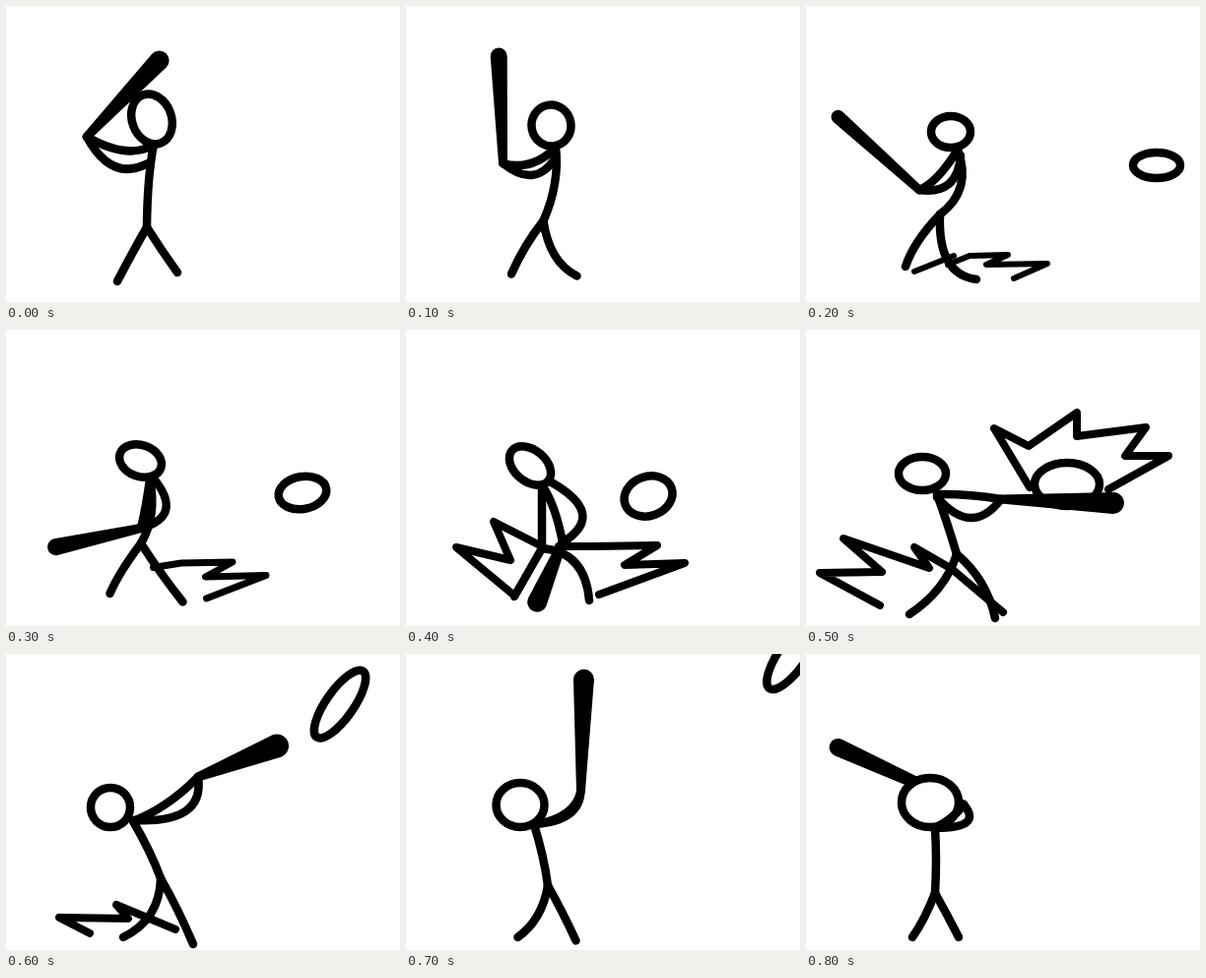
An HTML page that plays this animation: 400x301 px, repeating every 1.3 s.

```html
<!DOCTYPE html>
<html lang="en">
<head>
<meta charset="utf-8">
<title>Batter</title>
<style>
  html, body { margin: 0; width: 100%; height: 100%; overflow: hidden; background: #fff; }
  svg { display: block; width: 100vw; height: 100vh; }
  path, ellipse { fill: none; stroke: #000; stroke-width: 8.5; stroke-linecap: round; stroke-linejoin: round; }
  .head { fill: #fff; }
  .bat { fill: #000; stroke: none; }
</style>
</head>
<body>
<svg id="stage" viewBox="0 0 400 301"></svg>
<script>
const STEP = 100, LOOP = 1300, LAST = 8;

// Key poses; steps in between are mixed from their neighbours.
// head, ball: cx, cy, rx, ry, tilt.  bat: length, angle, end radius.
// legs, arms: middle joint and end; side is where the second arm begins.
const keys = [
  { at: 0, head: [148, 115, 20, 26, -20], ball: [520, 160, 24, 13, 0],
    neck: [150, 141], waist: [145, 178], hip: [143, 225],
    legs: [[129, 250], [113, 280], [158, 248], [174, 271]],
    side: [144, 160], elbows: [[120, 147], [110, 163]], hand: [82, 133],
    bat: [107, -46.5, 10] },

  { at: 2, head: [147, 128, 20, 16, 0], ball: [356, 162, 24, 13, 0],
    neck: [154, 146], waist: [157, 183], hip: [136, 212],
    legs: [[114, 239], [101, 265], [144, 259], [173, 278]],
    side: [157, 152], elbows: [[134, 173], [145, 181]], hand: [115, 187],
    bat: [111, -138, 7], ink: 6,
    bolts: {
      dust: [[110, 270], [150, 254]],
      right: [[144, 263], [166, 254], [205, 253], [183, 263], [245, 262], [211, 277]]
    } },

  { at: 4, head: [126, 138, 24, 16, 40], ball: [246, 169, 25, 20, -20],
    neck: [138, 158], waist: [138, 190], hip: [138, 222],
    legs: [[122, 250], [110, 271], [172, 237], [186, 275]],
    side: [146, 154], elbows: [[150, 182], [179, 186]], hand: [159, 216],
    bat: [66, -247, 10], ink: 8,
    bolts: {
      left: [[138, 220], [89, 195], [106, 234], [51, 221], [110, 270]],
      right: [[155, 220], [190, 220], [255, 219], [222, 239], [283, 237], [196, 269]]
    } },

  { at: 5, head: [118, 146, 24, 17, 0], ball: [265, 157, 33, 22, 0],
    neck: [133, 167], waist: [143, 196], hip: [153, 228],
    legs: [[135, 262], [105, 289], [178, 257], [192, 293]],
    side: [133, 170], elbows: [[165, 168], [167, 191]], hand: [198, 172],
    bat: [114, -358, 11], ink: 8,
    bolts: {
      left: [[200, 287], [148, 243], [110, 221], [125, 242], [38, 212], [77, 246], [14, 247], [75, 280]],
      burst: [[227, 160], [191, 100], [226, 118], [275, 84], [275, 108], [345, 99], [324, 128], [368, 128], [307, 162]]
    } },

  { at: 6, head: [106, 156, 20, 20, 0], ball: [339, 51, 41, 14, -55],
    neck: [129, 170], waist: [145, 200], hip: [157, 228],
    legs: [[147, 264], [119, 288], [174, 260], [190, 295]],
    side: [129, 169], elbows: [[163, 152], [182, 160]], hand: [195, 125],
    bat: [86, -381.5, 12], ink: 8,
    bolts: { left: [[172, 280], [112, 255], [124, 269], [54, 268], [85, 284]] } },

  { at: LAST, head: [126, 151, 29, 25, 0], ball: [446, -48, 41, 14, -55],
    neck: [131, 177], waist: [132, 210], hip: [131, 243],
    legs: [[120, 268], [108, 288], [143, 265], [155, 288]],
    side: [131, 177], elbows: [[163, 171], [148, 166]], hand: [160, 153],
    bat: [140, -515.5, 9] }
];

// Blends numbers, and everything that both values share
function mix(a, b, t) {
  if (typeof a === 'number') return a + (b - a) * t;
  if (Array.isArray(a)) return a.map((v, i) => mix(v, b[i], t));
  const shared = Object.keys(a).filter(k => k in b);
  return Object.fromEntries(shared.map(k => [k, mix(a[k], b[k], t)]));
}

function poseAt(step) {
  const i = keys.findIndex(k => k.at >= step);
  const b = keys[i], a = keys[i - 1];
  return b.at === step ? b : mix(a, b, (step - a.at) / (b.at - a.at));
}

const path = (d, attrs = '') => `<path d="${d}" ${attrs}/>`;

// Bent limb that passes through its middle joint
function limb(a, mid, b) {
  const c = mid.map((v, k) => 2 * v - (a[k] + b[k]) / 2);
  return path(`M${a}Q${c} ${b}`);
}

const oval = ([x, y, rx, ry, tilt], cls) =>
  `<ellipse class="${cls}" rx="${rx}" ry="${ry}" transform="translate(${x} ${y}) rotate(${tilt})"/>`;

// Tapered club with round ends, laid along x and turned about the hand
function club([x, y], [len, angle, r]) {
  const grip = 4.5;
  const d = `M0 ${-grip}L${len} ${-r}A${r} ${r} 0 0 1 ${len} ${r}L0 ${grip}A${grip} ${grip} 0 0 1 0 ${-grip}Z`;
  return path(d, `class="bat" transform="translate(${x} ${y}) rotate(${angle})"`);
}

function figure(p) {
  const [kneeL, footL, kneeR, footR] = p.legs;
  const bolts = Object.values(p.bolts || {});
  return [
    club(p.hand, p.bat),
    oval(p.head, 'head'),
    oval(p.ball, 'ball'),
    limb(p.neck, p.waist, p.hip),
    limb(p.hip, kneeL, footL),
    limb(p.hip, kneeR, footR),
    limb(p.neck, p.elbows[0], p.hand),
    limb(p.side, p.elbows[1], p.hand),
    ...bolts.map(b => path('M' + b.join('L'), `style="stroke-width:${p.ink}"`))
  ].join('');
}

const stage = document.getElementById('stage');
const start = performance.now();
let shown = -1;

function tick() {
  const ms = (performance.now() - start) % LOOP;
  const step = Math.min(LAST, Math.floor(ms / STEP));
  if (step !== shown) stage.innerHTML = figure(poseAt(shown = step));
  requestAnimationFrame(tick);
}
tick();
</script>
</body>
</html>
```
